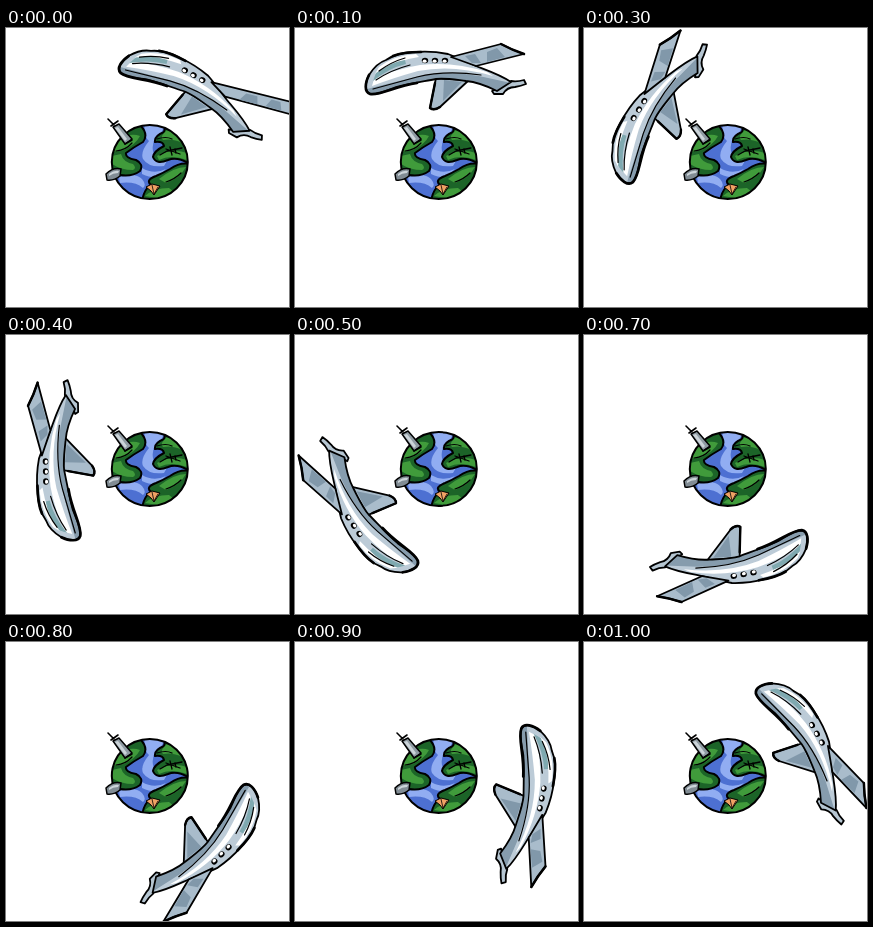
An HTML page that plays this animation: 283 px wide and 279 px high, repeating every 1100 ms.

```html
<!DOCTYPE html>
<html lang="en">
<head>
<meta charset="utf-8">
<title>Plane around the globe</title>
<style>
  html, body { margin: 0; width: 100%; height: 100%; overflow: hidden; background: #fff; }
  svg { display: block; width: 283px; height: 279px; }
  .ink { fill: none; stroke: #000; stroke-linecap: round; stroke-linejoin: round; }
  .edge { stroke: #000; stroke-linejoin: round; }
</style>
</head>
<body>
<svg viewBox="0 0 283 279">
  <defs>
    <clipPath id="disc"><ellipse cx="143.8" cy="134" rx="38" ry="37"/></clipPath>
    <clipPath id="hull"><use href="#body"/></clipPath>
    <path id="body" d="M-66 6L-52-3C-40 3-32 6-21 7C-5 9 0 10 9 9C25 6 38 4 49 1C60-3 67-7 74-6C81-4 80 5 76 13C71 21 65 26 59 28C50 34 40 36 29 36C18 37 7 36-3 34C-14 30-22 26-31 22C-44 17-56 13-66 6Z"/>
  </defs>

  <g id="globe">
    <g clip-path="url(#disc)">
      <rect x="104" y="94" width="80" height="80" fill="#4d70d2"/>
      <path fill="#91adf2" d="M139 95L160 95L155 105Q145 112 147 123Q148 130 162 131L158 138Q143 140 137 131Q134 124 143 113Q137 108 139 95Z M113 149Q129 144 136 151Q141 157 137 160Q129 153 114 155Z M136 140Q148 147 160 141L151 149Q145 150 136 146Z"/>
      <g class="edge" fill="#1c6428" stroke-width="2">
        <path d="M104 95L134 97Q143 106 137 114Q128 119 120 125Q119 130 130 132Q138 136 134 143Q126 149 114 147L102 150Z"/>
        <path d="M160 95L185 105L184 136Q171 128 162 132Q150 137 147 129Q148 123 158 118Q157 113 149 114Q148 108 158 104Z"/>
        <path d="M184 136Q174 134 164 141Q157 145 150 148Q139 152 145 157Q138 161 136 173L175 174Z"/>
      </g>
      <g fill="#409b3b">
        <path d="M112 112Q124 104 134 108Q130 116 118 122L107 124Z M106 128L115 126Q117 134 127 136Q131 140 127 142Q115 142 106 136Z"/>
        <path d="M161 102Q172 105 177 115Q166 110 157 112Q153 109 161 102Z M151 128Q166 120 181 125L181 132Q165 126 153 132Z"/>
        <path d="M153 151Q168 139 180 139Q174 150 160 155Z M139 168Q148 160 163 160L168 164L158 171Z"/>
      </g>
      <path class="ink" stroke-width="1.2" d="M110 123Q120 122 126 115M151 111Q160 108 166 111M160 154Q169 151 175 145"/>
    </g>
    <ellipse class="ink" cx="143.8" cy="134" rx="38" ry="37" stroke-width="2"/>
    <path class="ink" stroke-width="1.3" d="M154 127L161 123L176 120M160 121L174 126M164 119L166 127M169 121L170 125"/>
    <path class="edge" fill="#f0a264" stroke-width="1" d="M140 159L146 156L154 158L148 167L145 163Z"/>
    <path class="ink" stroke="#7b3b12" stroke-width=".8" d="M146 157L148 166L152 159"/>
    <path class="edge" fill="#8f9ba3" stroke-width="1.5" d="M107 99L113 96L126 111L119 116Z"/>
    <path fill="#ccd4d9" d="M109 100L112 99L121 111L119 113Z"/>
    <path class="ink" stroke-width="1.6" d="M102 91L108 97M105 98L112 93M119 116L126 112"/>
    <path class="edge" fill="#818c94" stroke-width="1.5" d="M100 146Q107 139 115 141L114 148Q108 153 101 152Z"/>
    <path fill="#ccd4d9" d="M103 146Q108 142 113 143L112 145Q107 145 103 148Z"/>
  </g>

  <g id="plane">
    <path class="edge" stroke-width="1.8" fill="#a9bccb" d="M-24 8L5-19Q11-23 15-20L9 10Z"/>
    <path fill="#8198aa" d="M-17 6L2-13L1 8Z"/>
    <path class="ink" stroke-width="2.4" d="M5-19Q11-23 15-20L10 5"/>
    <path class="edge" stroke-width="1.8" fill="#b6c6d2" d="M-81 4L-79 8Q-72 6-66 7L-52-1L-47-3L-49-6L-58-6Q-62 1-70 1Q-76 2-81 4Z"/>

    <use href="#body" fill="#bccbd7"/>
    <g clip-path="url(#hull)">
      <path fill="#869cad" d="M-66 5L-52-4C-40 3-32 6-21 7C0 10 25 6 49 1L75-7L78-1Q50 6 30 11Q-4 18-34 12Z"/>
      <path fill="#fff" d="M-48 12Q-8 24 27 17Q52 10 73 2L71 9Q49 19 25 23Q-8 27-42 16Z"/>
      <path fill="#fff" d="M26 31Q49 28 70 14L66 21Q50 33 29 34Z"/>
      <path fill="#7fa9b0" d="M39 24Q56 20 72 7L69 15Q54 26 40 28Z"/>
      <path class="ink" stroke-width="1.2" d="M-36 13Q0 18 28 11Q50 5 72-1M35 23Q54 18 69 8M40 30Q54 26 66 17"/>
    </g>
    <use href="#body" class="ink" stroke-width="1.8"/>
    <path class="ink" stroke-width="2.7" d="M28 5C50 2 65-8 75-6C81-4 80 5 76 13M52 32Q42 36 24 36"/>

    <g id="wing">
      <path class="edge" stroke-width="1.8" fill="#a9bccb" d="M-31 22L-79 34Q-67 38-56 44L-6 31Z"/>
      <path fill="#8198aa" d="M-42 26L-60 31L-52 40L-42 36ZM-36 25L-27 25L-20 32L-30 34Z"/>
      <path class="ink" stroke-width="2.5" d="M-79 34Q-67 38-56 44"/>
    </g>
    <g id="longWing">
      <path class="edge" stroke-width="1.8" fill="#a9bccb" d="M-28 24L-101 42L-102 55L-9 30Z"/>
      <path fill="#8198aa" d="M-42 28L-60 33L-56 40L-45 37ZM-68 35L-84 39L-79 46L-70 44Z"/>
    </g>
    <g id="windows"></g>
  </g>
</svg>
<script>
  // One pose per step: centre x, centre y, heading in degrees
  const poses = [
    [183, 76, -151],
    [150, 60, -180],
    [113, 65, -209],
    [83.5, 87.5, -238],
    [67, 126, -271],
    [76, 167, -304],
    [102.5, 202, -337],
    [145, 214, -370],
    [189, 200, -405],
    [218, 161, -439],
    [214, 114, -479.5]
  ];
  const stepMs = 100;
  const byId = id => document.getElementById(id);
  const plane = byId("plane"), wing = byId("wing"), longWing = byId("longWing");

  byId("windows").innerHTML = [0, 10, 20].map(x =>
    `<ellipse cx="${x}" cy="27.5" rx="3.2" ry="2.8"/>
     <ellipse cx="${x + 0.4}" cy="26.8" rx="2" ry="1.6" fill="#fff"/>`).join("");

  const start = performance.now();

  function draw() {
    const elapsed = Math.max(0, performance.now() - start);
    const step = Math.floor(elapsed / stepMs) % poses.length;
    const [x, y, angle] = poses[step];
    plane.setAttribute("transform", `translate(${x} ${y}) rotate(${angle})`);
    // The near wing is seen at full span only on the first pose
    wing.setAttribute("opacity", step ? 1 : 0);
    longWing.setAttribute("opacity", step ? 0 : 1);
    requestAnimationFrame(draw);
  }
  draw();
</script>
</body>
</html>
```
